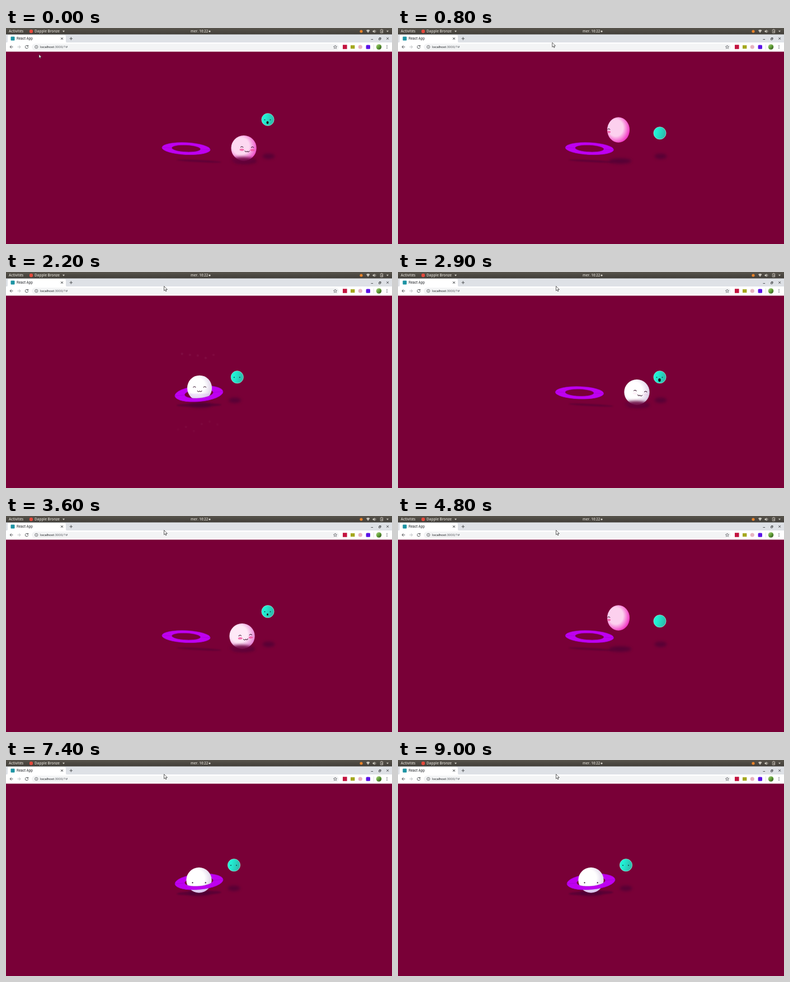
Recreate the animation shown at these times as an HTML page. Size 690x388 px, loop 9.9 s.

```html
<!DOCTYPE html>
<html lang="fr">
<head>
<meta charset="utf-8">
<title>React App</title>
<style>
  html, body { margin: 0; width: 100%; height: 100%; overflow: hidden; background: #790037; }
  svg { display: block; width: 100vw; height: 100vh; }
  .bar { font: 600 6.4px "Open Sans", sans-serif; fill: #d9d5cd; }
  .tray { fill: #c9c5bc; stroke: none; }
  .trayLine { fill: none; stroke: #c9c5bc; stroke-width: .8; }
  .ui { font: 6.3px Roboto, sans-serif; fill: #24272b; }
  .line { fill: none; stroke: #4a4d51; stroke-width: .95; }
  .ink { fill: none; stroke: #3b1730; stroke-width: 1; stroke-linecap: round; stroke-linejoin: round; }
  .ring { fill: #bf00f0; stroke: #9c00cc; stroke-width: .5; }
</style>
</head>
<body>
<svg viewBox="0 0 690 388">
  <defs>
    <linearGradient id="barFill" x2="0" y2="1">
      <stop stop-color="#57534b"/><stop offset="1" stop-color="#403d38"/>
    </linearGradient>
    <linearGradient id="avatar" x2="1" y2="1">
      <stop stop-color="#b5d78a"/><stop offset=".5" stop-color="#5f9f35"/><stop offset="1" stop-color="#2e4a22"/>
    </linearGradient>
    <radialGradient id="planetFill" cx=".38" cy=".42" r=".66">
      <stop id="planetMain" offset=".5"/><stop id="planetEdge" offset="1"/>
    </radialGradient>
    <linearGradient id="moonFill" x2="1" y2=".25">
      <stop offset=".3" stop-color="#20f2d6"/><stop offset="1" stop-color="#2cbcac"/>
    </linearGradient>
    <filter id="soft" x="-50%" y="-100%" width="200%" height="300%"><feGaussianBlur stdDeviation="2.6"/></filter>
    <filter id="thin" x="-30%" y="-200%" width="160%" height="500%"><feGaussianBlur stdDeviation="1.2"/></filter>
    <clipPath id="planetClip"><circle r="22.7"/></clipPath>
    <clipPath id="moonClip"><circle r="11.2"/></clipPath>
  </defs>

  <rect width="690" height="388" fill="#790037"/>

  <!-- Desktop bar -->
  <rect width="690" height="12" fill="url(#barFill)"/>
  <g class="bar">
    <text x="5" y="8.3">Activités</text>
    <circle cx="45" cy="6" r="3.2" fill="#e5493c"/>
    <text x="51" y="8.3">Dapple Bronze</text>
    <path d="M101 4.8h4l-2 2.6z"/>
    <text x="330" y="8.3" style="font-size:6.2px">mer. 16:22</text>
    <circle cx="364" cy="6" r="1.6"/>
  </g>
  <circle cx="635" cy="6" r="2.6" fill="#e8832a"/>
  <path class="tray" d="M644 4.3q3.2-2.6 6.4 0l-3.2 4.4zM655.5 4.8h1.6l2-1.8v6l-2-1.8h-1.6zM680 4.8h4l-2 2.6z"/>
  <path class="trayLine" d="M660.2 4q1.6 2 0 4M669.3 3.2h4.4v5.6h-4.4zM670.7 2.3h1.6M672.8 4.5l-1.8 2h2l-1.6 2"/>

  <!-- Browser window -->
  <rect y="11.5" width="690" height="15" fill="#dee1e6"/>
  <path d="M0 26.5q3 0 3-3v-8q0-3 3-3h98q3 0 3 3v8q0 3 3 3z" fill="#fff"/>
  <rect x="8.5" y="15.5" width="7" height="7" rx="1" fill="#1c93a3"/>
  <text class="ui" x="19" y="21.3">React App</text>
  <path class="line" d="M98 17l4 4m0-4l-4 4M113.6 19h5.4m-2.7-2.7v5.4M652.5 20.5h3.6M666.5 18.7h2.6v2.6h-2.6zM667.5 18.5v-1h2.6v2.6h-1M680.3 17l3.8 3.8m0-3.8l-3.8 3.8"/>
  <rect y="26" width="690" height="16.5" fill="#fff"/>
  <rect x="46" y="28.2" width="549" height="11.8" rx="5.9" fill="#f3f4f5"/>
  <path class="line" d="M12.5 34H7m2.7-2.7L7 34l2.7 2.7"/>
  <path class="line" d="M20.5 34H26m-2.7-2.7L26 34l-2.7 2.7" style="stroke:#b7babd"/>
  <path class="line" d="M39 32.2a2.7 2.7 0 1 0 .7 2.3M39.6 30.8v2.1h-2.1"/>
  <circle class="line" cx="54.3" cy="34" r="2.7" style="stroke-width:.7"/>
  <path class="line" d="M54.3 33.6v1.8M54.3 32.2v.7" style="stroke-width:.8"/>
  <text class="ui" x="61" y="36.2" style="font-size:6.1px">localhost<tspan fill="#5f6368">:3000/?#</tspan></text>
  <path class="line" style="stroke-width:.7" d="M588.5 31l.9 2 2.2.2-1.7 1.5.5 2.1-1.9-1.1-1.9 1.1.5-2.1-1.7-1.5 2.2-.2z"/>
  <rect x="602" y="30.2" width="7.6" height="7.6" fill="#c3143f"/>
  <rect x="616" y="31" width="7.4" height="6.2" fill="#a5a820"/>
  <circle cx="633.3" cy="34" r="3.6" fill="#e6b3c0"/>
  <rect x="643.6" y="30.4" width="7.4" height="7.4" rx="1.5" fill="#5b12e6"/>
  <path d="M657.3 29.5v9" stroke="#d5d8dc" stroke-width=".7"/>
  <circle cx="666.5" cy="34" r="4.8" fill="url(#avatar)"/>
  <path d="M681 31.5v5.2" stroke="#4a4d51" stroke-width="1.5" stroke-linecap="round" stroke-dasharray="0 2.5"/>

  <!-- Scene -->
  <g fill="#4c0034">
    <ellipse id="ringShadow" rx="40" filter="url(#thin)" opacity=".62"/>
    <ellipse id="planetShadow" cy="239" rx="20" ry="5" filter="url(#soft)" opacity=".75"/>
    <ellipse id="moonShadow" cy="230.5" rx="11" ry="5" filter="url(#soft)" opacity=".7"/>
  </g>
  <g id="sparks"></g>
  <path id="ringBack" class="ring" fill-rule="evenodd"/>
  <g id="planet">
    <circle r="22.7" fill="url(#planetFill)"/>
    <g clip-path="url(#planetClip)">
      <rect id="underside" x="-24" y="10" width="48" height="14" fill="#d3aaf0"/>
      <g id="happy">
        <g id="blush" fill="#f2559f"><ellipse cx="-9.5" cy="1.7" rx="4" ry="2"/><ellipse cx="9.5" cy="1.7" rx="4" ry="2"/></g>
        <path class="ink" d="M-11.7-2.7q2.2-2.7 4.4 0M7.3-2.7q2.2-2.7 4.4 0M-4 3.6q2 3 4 .3 2 2.7 4-.3"/>
      </g>
      <g id="calm" fill="#2c1830"><circle cx="-11.5" cy="4.6" r="1.1"/><circle cx="11.7" cy="4.6" r="1.1"/></g>
    </g>
  </g>
  <ellipse id="floorShade" cy="237" rx="20" ry="5.5" fill="#68003a" filter="url(#soft)"/>
  <path id="ringFront" class="ring"/>
  <g id="moon">
    <circle r="11.1" fill="url(#moonFill)" stroke="#a8e4d6" stroke-width=".7"/>
    <g clip-path="url(#moonClip)">
      <g id="moonFace" fill="#123c46">
        <circle cx="-5" cy=".4" r=".95"/><circle cx="5" cy=".4" r=".95"/>
        <ellipse id="mouth" cy="5.3" fill="#12151c"/>
      </g>
    </g>
  </g>
  <path id="cursor" d="M0 0V8.2l1.9-1.7 1.2 2.8 1.3-.6-1.2-2.7h2.6z" fill="#fff" stroke="#222" stroke-width=".7"/>
</svg>

<script>
const LOOP = 9900, STEP = 100, DANCE = 4000;
const LEAVE = 2150, ARRIVE = 2850, RETURN = 4450, LAND = 5250, BURST = 1650;
const HOME_X = 345, MOON_X = 407.5;

const $ = id => document.getElementById(id);
const set = (id, attrs) => {
  for (const key in attrs) $(id).setAttribute(key, attrs[key]);
};

const clamp = v => Math.max(0, Math.min(1, v));
const part = (t, from, to) => clamp((t - from) / (to - from));
const ease = (t, from, to) => (1 - Math.cos(Math.PI * part(t, from, to))) / 2;
const arch = (t, from, to) => Math.sin(Math.PI * part(t, from, to));
const mix = (a, b, k) => `rgb(${a.map((v, i) => Math.round(v + (b[i] - v) * k))})`;
const random = seed => {
  const v = Math.sin(seed * 12.9898) * 43758.5453;
  return v - Math.floor(v);
};

// Sparks alternate between flying above and below the planet.
const sparks = Array.from({ length: 11 }, (_, i) => {
  const up = i % 2;
  const dot = document.createElementNS($("sparks").namespaceURI, "circle");
  dot.setAttribute("r", 2.2);
  dot.setAttribute("fill", mix([255, 244, 252], [245, 130, 200], random(i + 1) * .7));
  $("sparks").append(dot);
  return {
    dot,
    dx: -17 + 3.2 * i,
    dy: up ? -28 - 6 * random(i + 20) : 22 + 14 * random(i + 40),
    alpha: up ? 1 : .4 + .4 * random(i + 60)
  };
});

function drawSparks(t) {
  const age = t < 2 * DANCE ? t % DANCE - BURST : 0;
  const fade = age > 0 ? 1 - part(age, 360, 560) : 0;
  for (const { dot, dx, dy, alpha } of sparks) {
    dot.setAttribute("cx", HOME_X + dx * age / 250);
    dot.setAttribute("cy", 216 + dy * age / 250);
    dot.setAttribute("opacity", alpha * fade);
  }
}

function drawRing(c) {
  const slide = ease(c, LEAVE, 3100) - ease(c, RETURN, 4900);
  const flat = ease(c, LEAVE, 3100) - ease(c, 4800, LAND);
  const w = 43.2, h = 14 - 3.2 * flat, holeW = 25.8, holeH = h * .58;
  const transform = `translate(${HOME_X - 23 * slide} ${218.6 - 2 * flat}) rotate(${-5.3 + 8 * flat})`;
  const oval = (rx, ry) => `M${-rx} 0A${rx} ${ry} 0 1 1 ${rx} 0A${rx} ${ry} 0 1 1 ${-rx} 0Z`;
  set("ringBack", { transform, d: oval(w, h) + oval(holeW, holeH) });
  set("ringFront", {
    transform,
    d: `M${-w} 0A${w} ${h} 0 0 0 ${w} 0L${holeW} 0A${holeW} ${holeH} 0 0 1 ${-holeW} 0Z`
  });
}

function drawPlanet(c) {
  const out = ease(c, LEAVE, ARRIVE) - ease(c, RETURN, LAND);
  const lift = arch(c, LEAVE, ARRIVE) + arch(c, RETURN, LAND);
  const sway = arch(c, 2950, 4150);
  const inside = 1 - ease(c, LEAVE, 2300) + ease(c, 5100, LAND);
  const pink = ease(c, 2750, 4500) - ease(c, 4800, 6000);
  const turn = 6 * ease(c, LEAVE, ARRIVE) - 35 * ease(c, RETURN, 4800) + 29 * ease(c, 5050, LAND);
  const happy = c > LEAVE && c < 5080;
  const x = HOME_X + 82 * out - 5 * sway;

  set("planet", { transform: `translate(${x} ${215.8 - 33.5 * lift}) scale(${1 - .12 * lift} 1)` });
  set("planetMain", { "stop-color": mix([255, 255, 255], [252, 208, 238], pink) });
  set("planetEdge", { "stop-color": mix([216, 204, 228], [240, 36, 190], pink) });
  set("underside", { opacity: inside * .4 });
  set("happy", { transform: `translate(${turn} 1.5) rotate(${out * (6 - 11 * sway)})`, opacity: +happy });
  set("blush", { opacity: .8 * ease(c, 2750, 3500) });
  set("calm", { transform: `translate(${turn} 0)`, opacity: +!happy });
  set("planetShadow", { cx: x + 3 * (1 - inside) });
  set("floorShade", { cx: x - 2, opacity: .9 * (ease(c, 2650, ARRIVE) - ease(c, RETURN, 4600)) });
  set("ringShadow", { ry: 1.8 + 2 * inside, transform: `translate(${HOME_X} 239) rotate(${3 - 5 * inside})` });
}

// How far the moon has drifted from its resting place, 0 to 1.
const moonAway = t => t < 2100
  ? 1 - ease(t, 900, 1520)
  : ease(t, 2100, 2600) - ease(t, 5480, 6100);

function drawMoon(t, c) {
  const hop = arch(c, 3200, 4800);
  const turned = ease(c, 4300, 4700) - ease(c, 5200, 5550);
  const open = (ease(c, 2250, 2600) - ease(c, 4500, 4900)) * (1 - .4 * arch(c, 2950, 4150));
  set("moon", { transform: `translate(${MOON_X + 60.5 * moonAway(t)} ${188.8 - 24.3 * hop})` });
  set("moonFace", { transform: `translate(${-.5 - 21 * turned} 0)` });
  set("mouth", { rx: 2.4 * open, ry: 3.1 * open });
  set("moonShadow", { cx: MOON_X + 62 * moonAway(t - 50) });
}

function drawCursor(t) {
  const k = ease(t, 0, 900);
  set("cursor", { transform: `translate(${59 + 223.5 * k} ${47.5 - 22 * k}) scale(${.75 + .25 * k})` });
}

function render(t) {
  // The loop opens near the end of a dance, then plays one whole dance.
  const c = t < 2100 ? t + DANCE : t;
  drawSparks(t);
  drawRing(c);
  drawPlanet(c);
  drawMoon(t, c);
  drawCursor(t);
}

const start = performance.now();
function tick() {
  const t = (performance.now() - start) % LOOP;
  render(Math.floor(t / STEP) * STEP);
  requestAnimationFrame(tick);
}
tick();
</script>
</body>
</html>
```
